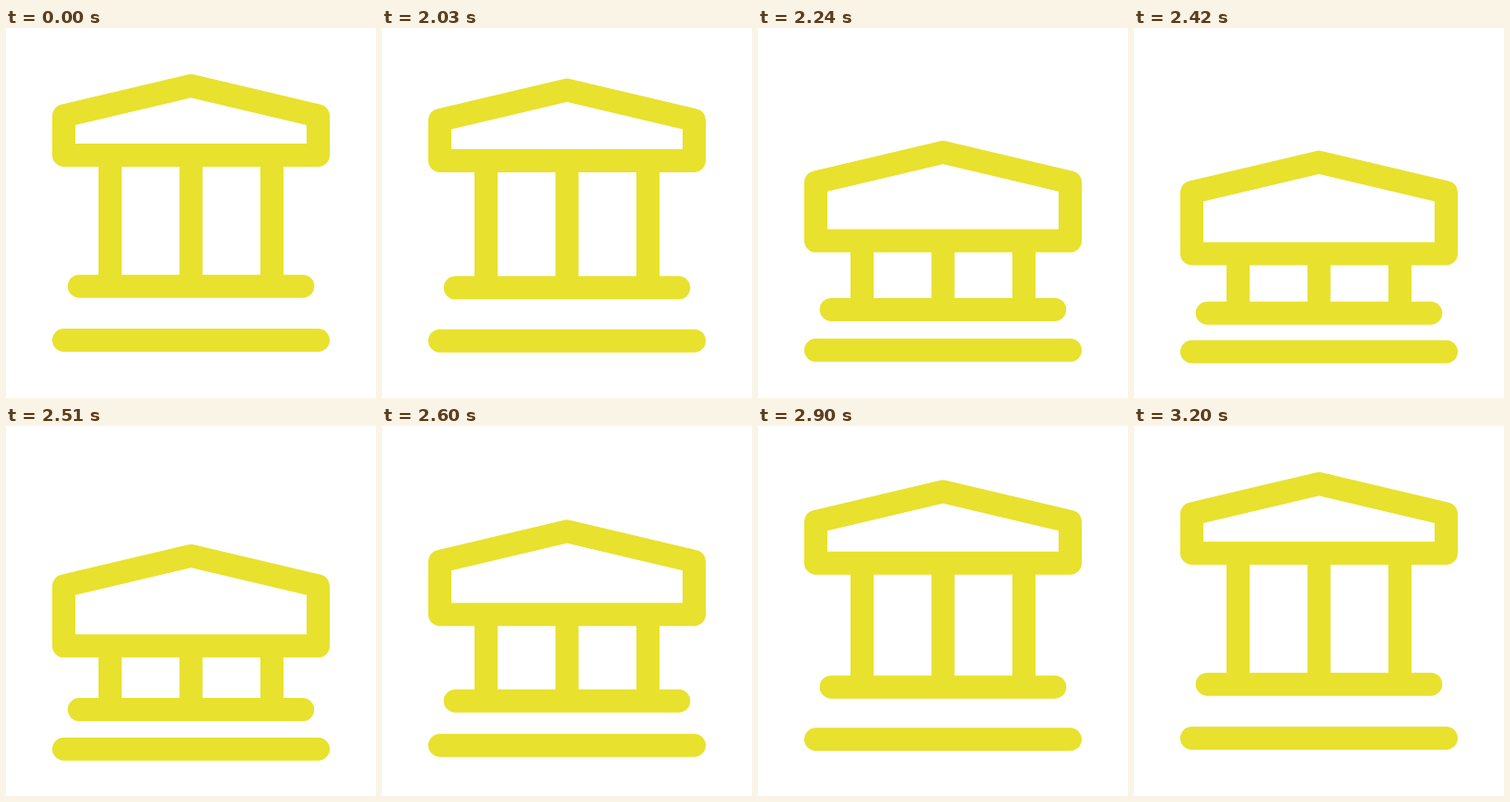
Write an HTML page that moves like this. It is 400 by 400 pixels and loops after 3.26 s.

```html
<!DOCTYPE html>
<html lang="en">
<head>
<meta charset="utf-8">
<title>Columned building</title>
<style>
  html, body { margin: 0; width: 100%; height: 100%; overflow: hidden; background: #fff; }
  svg { display: block; width: 100vw; height: 100vh; }
  path { fill: none; stroke: #e8e12e; stroke-width: 25; stroke-linecap: round; stroke-linejoin: round; }
  #columns { stroke-linecap: butt; }
</style>
</head>
<body>
<svg viewBox="0 0 400 400">
  <path id="roof"/>
  <path id="columns"/>
  <path id="base"/>
  <path id="ground"/>
</svg>
<script>
  const LOOP = 3260, STEP = 30, FIRST = 2030;
  const START = 1997, LOW = 2453, END = 3230;
  const [roof, columns, base, ground] =
    ['roof', 'columns', 'base', 'ground'].map(id => document.getElementById(id));

  // Cubic bezier easing with control points (x1, 0) and (x2, 1)
  function ease(x1, x2, x) {
    let lo = 0, hi = 1;
    for (let i = 0; i < 24; i++) {
      const s = (lo + hi) / 2, r = 1 - s;
      if (3 * r * r * s * x1 + 3 * r * s * s * x2 + s * s * s < x) lo = s;
      else hi = s;
    }
    return lo * lo * (3 - 2 * lo);
  }

  // How far the building is squashed: 0 at rest, 1 at the lowest point
  function squash(t) {
    if (t < FIRST) return 0;
    t = FIRST + Math.floor((t - FIRST) / STEP) * STEP;
    if (t >= 3200) return 0;
    if (t < LOW) return ease(0.2, 0.12, (t - START) / (LOW - START));
    return 1 - ease(0.2, 0.1, (t - LOW) / (END - LOW));
  }

  function draw(p) {
    const top = 62.5 + 82.8 * p;
    const eave = top + 32.5;
    const beam = 137.5 + 106.7 * p;
    const floor = 279.2 + 29.1 * p;
    const earth = 337.5 + 12.5 * p;
    roof.setAttribute('d', `M62.5 ${beam}V${eave}L200 ${top}L337.5 ${eave}V${beam}Z`);
    columns.setAttribute('d', [112.5, 200, 287.5].map(x => `M${x} ${beam}V${floor}`).join(''));
    base.setAttribute('d', `M79.2 ${floor}H320.8`);
    ground.setAttribute('d', `M62.5 ${earth}H337.5`);
  }

  const origin = performance.now();
  function tick() {
    draw(squash((performance.now() - origin) % LOOP));
    requestAnimationFrame(tick);
  }
  tick();
</script>
</body>
</html>
```
